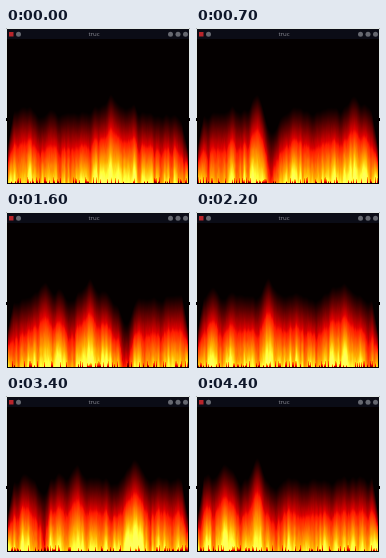
An HTML page with a canvas for the animation above (4800 ms loop, 184 by 156 pixels).

```html
<!DOCTYPE html>
<html lang="fr">
<head>
<meta charset="utf-8">
<title>truc</title>
<style>
html, body { margin: 0; width: 100%; height: 100%; overflow: hidden; background: #040000; }
svg, canvas { position: absolute; left: 0; top: 0; }
canvas { left: 2px; top: 12px; }
text { font: 6px "Noto Sans", sans-serif; fill: #85878f; text-anchor: middle; }
</style>
</head>
<body>
<svg width="184" height="156">
  <rect width="184" height="11" fill="#0b0c16"/>
  <path d="M.5 156V.5H183.5V156" fill="none" stroke="#e2e8e7"/>
  <path d="M0 90h1v3h-1zM183 90h1v3h-1z"/>
  <rect x="3" y="4" width="4.5" height="4.5" fill="#b8242a"/>
  <g fill="#666870">
    <circle cx="12.5" cy="6.2" r="2.5"/>
    <circle cx="164.5" cy="6.2" r="2.5"/>
    <circle cx="172" cy="6.2" r="2.5"/>
    <circle cx="179.5" cy="6.2" r="2.5"/>
  </g>
  <text x="88" y="8.3">truc</text>
</svg>
<canvas width="180" height="143"></canvas>
<script>
const W = 180, H = 143, LOOP = 4800;
const ctx = document.querySelector('canvas').getContext('2d');
const img = ctx.createImageData(W, H);

// Main flares and dips of each pose: x, extra height
const poses = [
  [[16, 8], [103, 14], [174, -8]],
  [[60, 14], [76, -18], [158, 16]],
  [[38, 12], [85, 14], [121, -26]],
  [[17, 10], [72, 14], [145, 12]],
  [[40, -8], [68, 14], [128, 14]],
  [[28, 9], [60, 22], [74, -10]]
];

const clamp = v => Math.max(0, Math.min(1, v));
const mix = (a, b, k) => a + (b - a) * k;
function rnd(a, b, c) {
  const v = Math.sin(a * 12.9898 + b * 78.233 + c * 37.719) * 43758.5453;
  return v - Math.floor(v);
}
// Smooth noise from -0.5 to 0.5 along x
function wave(x, scale, seed) {
  const i = Math.floor(x / scale), k = x / scale - i;
  return mix(rnd(i, scale, seed), rnd(i + 1, scale, seed), k * k * (3 - 2 * k)) - .5;
}

// One column of a pose: height, broad heat, and thin streaks near the base
function column(i, n) {
  const x = i + 2, broad = wave(x, 9, n), thin = wave(x, 4, n), hair = wave(x, 2, n);
  const flare = poses[n].reduce((sum, [cx, h]) => sum + h * Math.exp(-(((x - cx) / 8) ** 2)), 0);
  const edge = Math.min(1, .55 + Math.min(i, W - 1 - i) / 12);
  return [(71 + flare + 12 * broad + 5 * thin) * edge, .85 + flare / 80 + .2 * broad, .3 * thin + .25 * hair];
}
const columns = poses.map((_, n) => Array.from({ length: W }, (_, i) => column(i, n)));

function drawFire(place, seed) {
  const n = Math.min(Math.floor(place), poses.length - 2);
  for (let x = 0; x < W; x++) {
    const next = columns[n + 1][x];
    const [top, heat, streak] = columns[n][x].map((v, j) => mix(v, next[j], place - n));
    const gap = rnd(x, 5, seed) > .7 ? 1 + 5 * rnd(x, 6, seed) : 0;
    for (let y = 0; y < H; y++) {
      const d = H - 1 - y;
      let v = clamp(1 - d / top) * (heat + streak * clamp(1.1 - d / 65) + .04 * wave(y, 5, x + seed));
      if (d < gap) v *= .4 + .5 * d / gap;
      const p = (y * W + x) * 4;
      img.data[p] = 4 + 251 * clamp(v / .45) ** 1.2;
      img.data[p + 1] = 255 * clamp((v - .4) / .5);
      img.data[p + 2] = 90 * clamp((v - .75) / .25);
      img.data[p + 3] = 255;
    }
  }
  ctx.putImageData(img, 0, 0);
}

// Steps of 100 ms done since a start time
const steps = (t, start, n) => Math.max(0, Math.min(n, Math.floor((t - start) / 100) + 1));

let last = -1;
function frame(now) {
  const t = now % LOOP;
  const a = steps(t, 100, 6), b = steps(t, 1200, 5), c = steps(t, 2200, 1);
  const d = steps(t, 3200, 1), e = steps(t, 4200, 3);
  const flicker = steps(t, 2300, 2) + steps(t, 3000, 1);
  const seed = a + b + c + d + e + flicker;
  if (seed !== last) drawFire(a / 6 + b / 5 + c + d + e / 3, last = seed);
  requestAnimationFrame(frame);
}
frame(performance.now());
</script>
</body>
</html>
```
